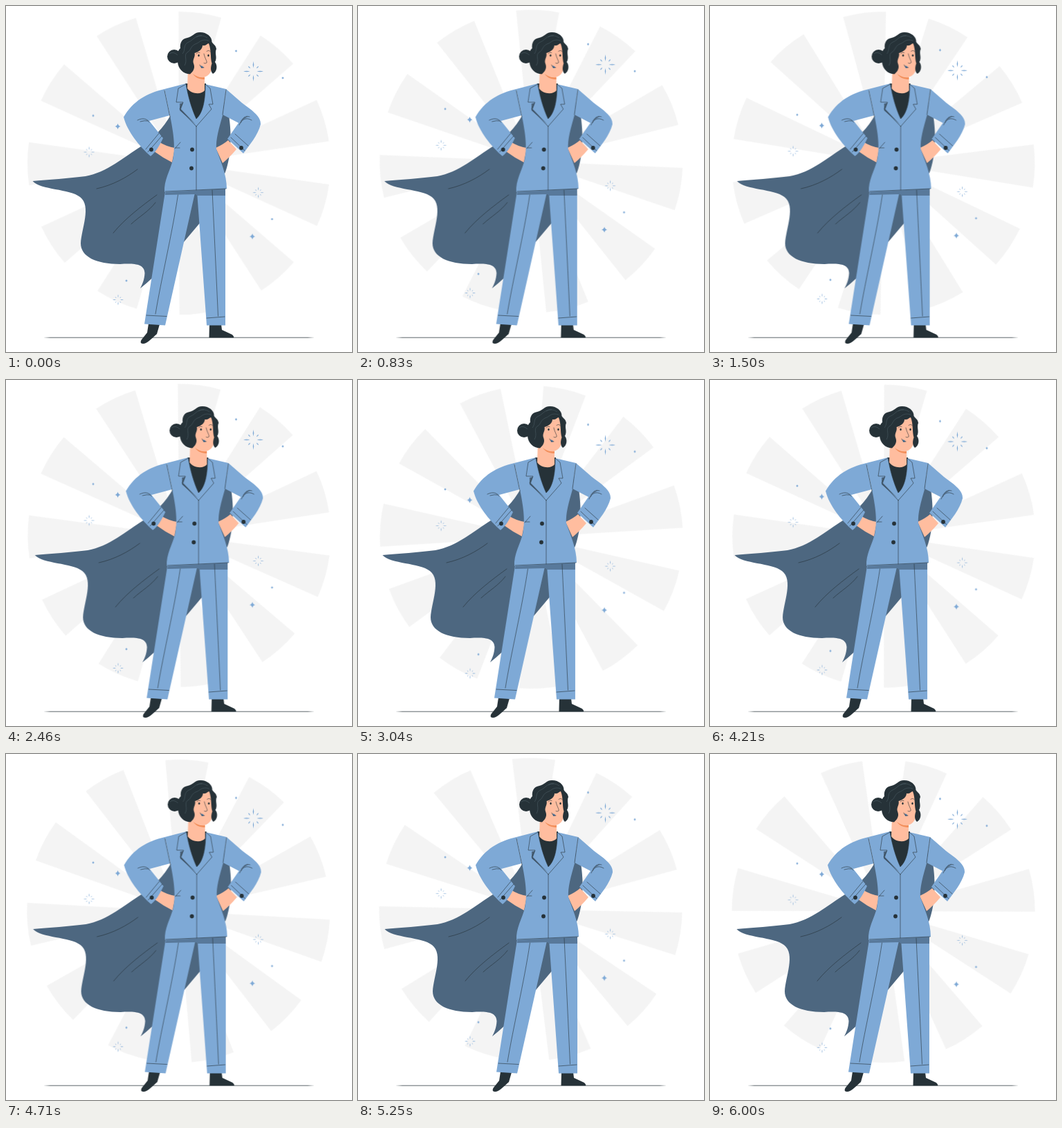
These frames come from a looping animation (500x500 px, 6.04 s). An HTML page:

```html
<!DOCTYPE html>
<html lang="en">
<head>
<meta charset="utf-8">
<title>Caped woman in a suit</title>
<style>
  html, body { margin: 0; width: 100%; height: 100%; overflow: hidden; background: #fff; }
  svg { display: block; width: 100vw; height: 100vh; }
  #rays, #sparkles, #hero { animation: 6040ms linear infinite; }
  #rays { fill: #f4f4f4; transform-origin: 250px 225.9px; animation-name: spin; }
  #sparkles { animation-name: float; }
  #hero { animation-name: shake; }
  .suit { fill: #7ea9d6; }
  .cape { fill: #4d6780; }
  .dark { fill: #263238; }
  .skin { fill: #ffbd9f; }
  .line { fill: none; stroke: #263238; stroke-width: .6; stroke-linecap: round; stroke-linejoin: round; }
  .strand { fill: none; stroke: #53646d; stroke-width: .5; }

  @keyframes spin {
    0% { transform: rotate(0deg); }
    24.83% { transform: rotate(344.8deg); }
    40.73% { transform: rotate(556deg); }
    50.33% { transform: rotate(692deg); }
    61.42% { transform: rotate(856.1deg); }
    77.98% { transform: rotate(1107.9deg); }
    99.34% { transform: rotate(1415.8deg); }
    100% { transform: rotate(1425deg); }
  }
  @keyframes float {
    0%, 26.5%, 51%, 76.2%, 99.7%, 100% { transform: translateY(0); }
    13.5%, 38.4%, 64.4%, 87.6% { transform: translateY(-10px); }
  }
  @keyframes shake {
    0%, 99.7%, 100% { transform: translateX(0); }
    11.3%, 90.2% { transform: translateX(-1px); }
    22.5%, 80.1% { transform: translateX(2px); }
    32.1%, 51.5%, 71% { transform: translateX(-4px); }
    41.6%, 61.3% { transform: translateX(4px); }
  }
</style>
</head>
<body>
<svg viewBox="0 0 500 500">
  <defs>
    <path id="star" d="M0-4Q.7-.7 4 0Q.7.7 0 4Q-.7.7-4 0Q-.7-.7 0-4Z" fill="#7ea9d6"/>
    <g id="burst" fill="#7ea9d6"></g>
  </defs>

  <g id="rays"></g>
  <path class="dark" d="M54 479L64 478.700H436L446 479L436 479.400H64Z"/>

  <g id="sparkles"></g>

  <g id="hero">
    <!-- cape -->
    <path class="cape" d="M239 156C227 177 212 192 195 203C172 217 145 241 115 246C92 249 60 251 38.500 253C50 266 92 264 107 276C124 289 109 322 108 343C108 362 130 373 165 373C184 372 200 372 200.500 386C200 396 197 402 194 408C217 390 238 366 257 341L284 309L317 240C326 216 326 182 322 158L312 130Z"/>
    <path class="line" d="M131 264C154 259 174 248 190 236M155 328C171 308 196 289 218 273M181 315C193 304 206 297 216 284"/>

    <!-- shoes and trousers -->
    <path class="dark" d="M206 459L222 460L218 474C211 480 204 488 198 488C194 488 194 485 196 482L204 472Z"/>
    <path class="dark" d="M294 460H311L312 468L327 475Q330 478 329 479.300H293.500Z"/>
    <path class="suit" d="M231 262L200 459.500L230 461.500L273.500 268L276 268L290 461.500H317L317 260Z"/>
    <path d="M231 265L317 262V274H276L274 272L230 273Z" fill="#58799b"/>
    <path class="line" d="M203 447L232 448.500M290 451L316 449M248.500 273C240 330 224 396 216 445M298 266C301 330 304 392 306.500 448"/>

    <!-- hands -->
    <path class="skin" d="M219 195Q231 203 244 205L240 226Q226 219 214 210Z"/>
    <path class="skin" d="M321 194Q314 200 303 205L313 227Q323 219 333 207Z"/>

    <!-- neck and top -->
    <path class="dark" d="M259 112H289V148L275 165L260 144Z"/>
    <path class="skin" d="M263 90L287 96V122C283 128 268 128 262 119Z"/>
    <path d="M270 98C275 102 281 104 287 103V106C280 106 274 104 270 98Z" fill="#f28f5b"/>

    <!-- jacket -->
    <path class="suit" d="M229 120L260 112C263 130 268 148 275 163C283 156 288 141 288 113L318 120L313 158C308 176 303 192 304 207C310 224 319 243 319 264L229 269C228 252 237 238 241 223C246 200 240 175 237 158Z"/>
    <path class="suit" d="M229 120C203 126 183 138 170 160.500C175 181 193 203 209 217C217 211 222 201 227 191L207 166L237 158Z"/>
    <path class="suit" d="M318 120L341 140C353 149 369 159 368 171C364 187 351 202 343 213L320 192L336 169L313 157Z"/>
    <path d="M251 141L256 140L253 149L274 171L251 151Z" fill="#4d6780"/>
    <path class="line" d="M260 113L249 119L246 139H256L251 149L275 174M288 113L295 119L299 142H293L297 149L275 174M260 112C263 130 268 148 275 163C284 154 288 139 288 113M275 174V266"/>
    <path class="line" d="M229 122L237 160M318 121L313 157M244 206L252 197M245 205L251 205M230 268L318 264"/>
    <path class="line" d="M202 207L221 184M205 211L225 188M331 185L350 202M325 190L345 209M190 165C198 161 204 163 207 168M194 167Q201 165 205 166M337 172C340 164 347 160 355 165M339 169L344 161Q348 158 352 160"/>
    <path d="M338 170Q340 160 350 160L344 163Z" fill="#4d6780"/>
    <g class="dark">
      <circle cx="269" cy="207.500" r="2.900"/><circle cx="268" cy="234.500" r="2.900"/>
      <circle cx="210" cy="207.500" r="2.900"/><circle cx="340" cy="205" r="2.900"/>
    </g>

    <!-- head -->
    <circle class="dark" cx="243" cy="73" r="10"/>
    <path class="skin" d="M266 68C274 50 290 49 297 56L298.500 84C298 98 290 104 281 103C271 101 264 92 264 80Z"/>
    <path class="dark" d="M297.500 52C298 44 289 37.500 280 38C272 38 269 45 262 46C254 47 251 54 252 61C246 66 249 73 248 81C249 91 256 98 266 98.500C270 95 274 90 271 83C269 77 274 74 272.500 68C279 66 284 62 284 57C289 58 291 54 293 54C297 64 295 75 297.500 83C295 90 296 95 299 98C305 95 306 86 302 81C306 74 301 69 304 62C303 56 299 55 297.500 52Z"/>
    <path class="strand" d="M293 50C283 47 280 52 276 54C266 57 268 64 262 67C256 71 263 78 258 86M283 43C273 42 270 50 264 52C255 56 260 64 255 69M291 46Q282 40 275 45M236 69Q242 65 248 71"/>
    <g class="dark"><ellipse cx="278.500" cy="71.500" rx="1.200" ry="1.700"/><ellipse cx="292.500" cy="71.500" rx="1.200" ry="1.700"/></g>
    <path class="line" stroke-width="1" d="M275 69Q277 66 280 67.500M290 65.500Q293 63 295.500 66M286 69C287 75 291 80 290 82Q288 84 286 82.500"/>
    <path d="M281 86Q284 86 286 89L282 90Z" fill="#557da6"/>
    <path class="line" d="M280 85Q281 90 286 89"/>
  </g>
</svg>
<script>
  const $ = id => document.getElementById(id);

  // Eleven equal wedges separated by gaps of the same width.
  const cx = 250, cy = 227.3, radius = 219, step = 2 * Math.PI / 11;
  const rim = a => `${cx + radius * Math.sin(a)} ${cy - radius * Math.cos(a)}`;
  let wedges = '';
  for (let i = 0; i < 11; i++) {
    const a = i * step - 0.007;
    wedges += `M${cx} ${cy}L${rim(a)}A${radius} ${radius} 0 0 1 ${rim(a + step / 2)}Z`;
  }
  $('rays').innerHTML = `<path d="${wedges}"/>`;

  // Long needles on the axes, short ones on the diagonals.
  let needles = '';
  for (let i = 0; i < 8; i++) {
    const [near, far] = i % 2 ? [6, 11] : [5, 14.5];
    const mid = (near + far) / 2;
    needles += `<path transform="rotate(${i * 45})" d="M${near} 0Q${mid}-1.6 ${far} 0Q${mid} 1.6 ${near} 0Z"/>`;
  }
  $('burst').innerHTML = needles;

  const place = (shape, list) => list.map(([x, y, s]) =>
    `<use href="#${shape}" transform="translate(${x} ${y}) scale(${s})"/>`).join('');
  $('sparkles').innerHTML =
    place('burst', [[357.5, 94.5, 1], [120, 211, .56], [364.5, 269.5, .56], [162, 424.5, .56]]) +
    place('star', [[161.5, 174, 1.05], [356, 333, 1.05], [126, 158.5, .5], [332.5, 65, .5],
      [400, 104, .5], [384.5, 308, .5], [174, 397, .5]]);
</script>
</body>
</html>
```
